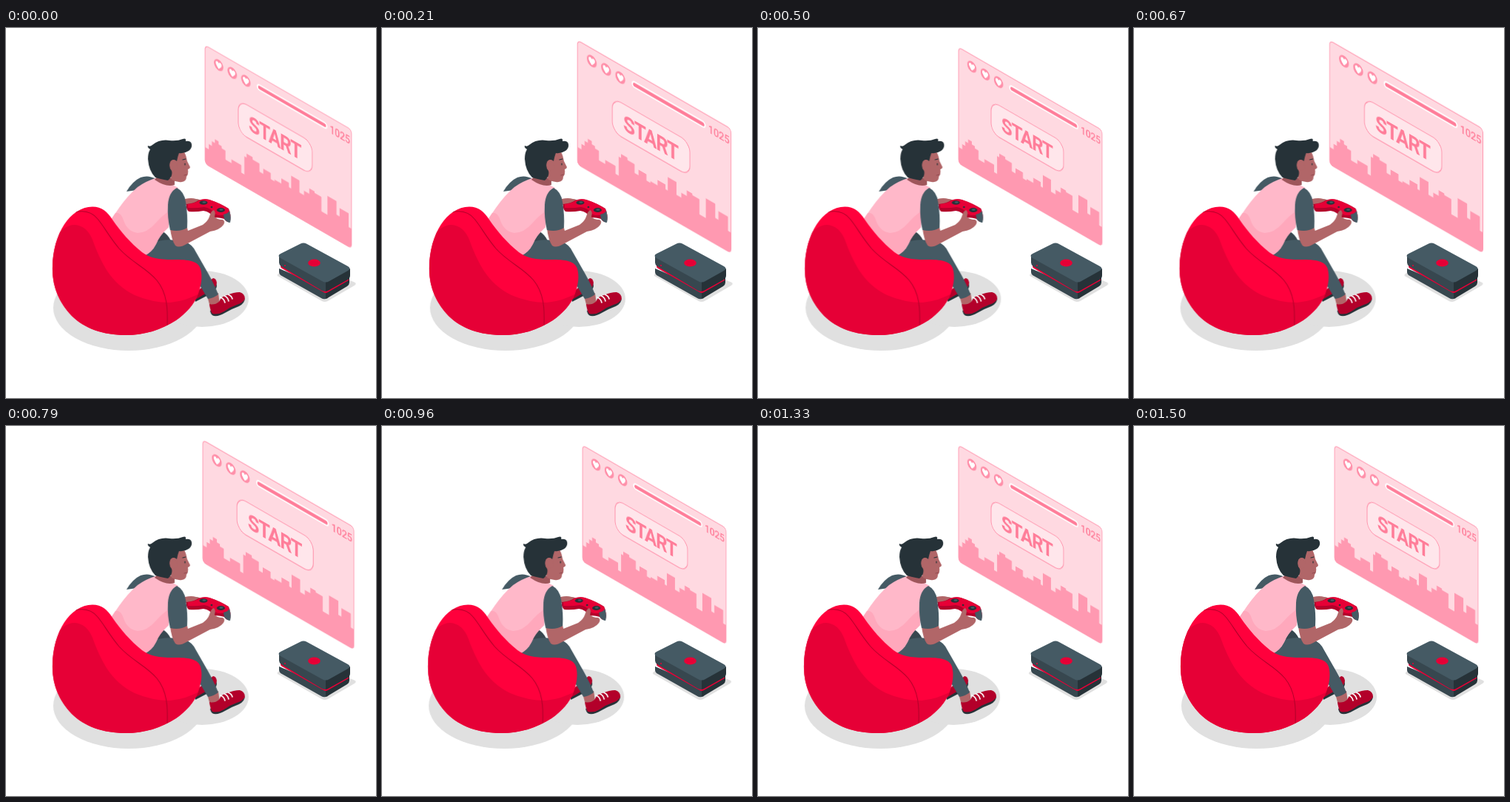
An HTML page for the animation above (1.54 s loop, 500 by 500 pixels).

```html
<!DOCTYPE html>
<html lang="en">
<head>
<meta charset="utf-8">
<title>Game night</title>
<style>
  html, body { margin: 0; width: 100%; height: 100%; overflow: hidden; background: #fff; }
  svg { display: block; width: 100vw; height: 100vh; }
  text { font-family: Roboto, sans-serif; text-anchor: middle; fill: #ff7d99; }

  /* 1.5 s cycles (steps of 150 ms) followed by a 40 ms rest */
  .shake, .beat { animation: shake 1.54s linear -30ms infinite; }
  .beat { animation-name: beat; transform-origin: 368px 161px; }
  @keyframes shake {
    0%, 97.4%, 100% { transform: translateX(0); }
    9.74%, 87.66% { transform: translateX(-1px); }
    19.48%, 77.92% { transform: translateX(2px); }
    29.22%, 48.7%, 68.18% { transform: translateX(-4px); }
    38.96%, 58.44% { transform: translateX(4px); }
  }
  @keyframes beat {
    0%, 29.22%, 38.96%, 58.44%, 100% { transform: scale(1); }
    9.74%, 48.7% { transform: scale(1.1); }
  }

  .slate { fill: #455a64; }
  .steel { fill: #37474f; }
  .ink { fill: #263238; }
  .skin { fill: #b16668; }
  .red { fill: #ff003c; }
  .crimson { fill: #e60036; }
  .wine { fill: #b3002a; }
  .rose { fill: #ff8fa9; }
  .line { fill: none; stroke-linecap: round; stroke-linejoin: round; }
</style>
</head>
<body>
<svg viewBox="0 0 500 500">
  <defs>
    <clipPath id="panel"><rect width="224" height="157" rx="5"/></clipPath>
    <clipPath id="bag">
      <path id="bagShape" d="M63 322 C64 279 86 242 117 241.5 C130 241.5 137 248 144 259
        C155 275 168 290 184 303 C195 311 207 313 225 313 C242 313 259 313 263 325
        C266 336 264 348 260 359 C255 373 243 386 230 395 C210 408 187 415 162 415
        C132 415 106 406 89 389 C72 371 62 349 63 322 Z"/>
    </clipPath>
    <g id="life">
      <circle r="7.2" class="rose"/>
      <path d="M0 5 C-3 2.5 -4.6 .5 -4.6 -1.5 C-4.6 -4.5 -1 -5 0 -2.2 C1 -5 4.6 -4.5 4.6 -1.5 C4.6 .5 3 2.5 0 5 Z" fill="#fff"/>
    </g>
  </defs>

  <g class="shake" fill="#e0e0e0">
    <ellipse cx="166" cy="378" rx="102" ry="58"/>
    <ellipse cx="265" cy="366" rx="63" ry="38"/>
    <path d="M367 335 Q366 333 370 331 L405 316 L472 344 Q474 346 471 348 L435 369 Q431 371 427 369 Z"/>
  </g>

  <!-- Screen, drawn flat and projected -->
  <g class="beat">
    <g transform="matrix(.866 .5 0 1 271 26)">
      <rect width="224" height="157" rx="5" fill="#ffd9e1"/>
      <g clip-path="url(#panel)">
        <path id="city" transform="scale(1.155 1)" fill="#ff99b1"/>
      </g>
      <rect width="224" height="157" rx="5" fill="none" stroke="#ff99b1"/>
      <use href="#life" x="20.8" y="16"/>
      <use href="#life" x="41.6" y="16"/>
      <use href="#life" x="62.4" y="16"/>
      <rect x="79" y="10.2" width="108" height="8.6" rx="4.3" fill="#fff"/>
      <rect x="81" y="12.2" width="104" height="4.8" rx="2.4" fill="#ff7d99"/>
      <text x="206" y="20.5" font-size="14" font-weight="500" letter-spacing="-.2">1025</text>
      <rect x="50.8" y="47" width="113" height="43" rx="13" fill="#ffe6eb" stroke="#ff8fa9"/>
      <text x="106.5" y="79.5" font-size="28" font-weight="700" letter-spacing="-1.3">START</text>
    </g>
  </g>

  <!-- Console -->
  <g>
    <path class="steel" d="M369 325 L432 352 V366 Q429 367 426 365 L371 334 Q369 332 369 330 Z"/>
    <path class="ink" d="M432 352 L464 336 V344 Q464 347 461 349 L436 364 Q434 366 432 366 Z"/>
    <path class="crimson" d="M371 319 L432 350 L463 334 V341 L435 357 Q432 359 429 357 L373 325 Q371 324 371 322 Z"/>
    <path class="steel" d="M369 306 L432 343 V356 Q429 356 427 355 L372 322 Q369 320 369 317 Z"/>
    <path class="ink" d="M432 342 L465 325 V334 Q465 338 462 340 L437 354 Q434 356 432 356 Z"/>
    <path class="slate" d="M371 305 L398 291.5 Q402 289.5 406 291.5 L462 322 Q467 325 462 328 L437 342 Q432 345 427 342 L371 311 Q366 308 371 305 Z"/>
    <ellipse cx="416.5" cy="317.5" rx="8.3" ry="4.9" class="crimson"/>
    <circle cx="377" cy="321" r="1" class="crimson"/>
  </g>

  <g class="shake">
    <!-- Far shoe and legs -->
    <path class="wine" d="M256 358 L270 346 L280 338 Q284 338 285 344 Q285 351 278 355 L256 368 Z"/>
    <path class="ink" d="M256 367 L278 354 Q284 351 285 345 Q286 353 279 358 L256 370 Z"/>
    <path class="steel" d="M200 276 Q208 271 215 277 Q221 282 224 290 L203 298 Z"/>
    <path class="skin" d="M272 362 L287 358 L289 373 L276 377 Z"/>
    <path class="slate" d="M183 308 L201 290 Q215 283 242 289 Q252 292 257 303 L273 331 Q282 347 287 360 Q281 365 273 366 L258 341 L240 320 Z"/>

    <!-- Near shoe -->
    <path class="ink" d="M276 382 Q277 388 281 389 Q288 390 296 385 Q304 380 315 376 Q323 372 323 365 L318 366 Z"/>
    <path class="wine" d="M275 373 Q282 375 288 370 Q291 362 299 361 Q308 357 316 357 Q323 359 323 366
      Q321 371 312 374 Q303 377 295 383 Q287 388 279 386 Q276 382 275 373 Z"/>
    <path class="line" stroke="#fff" stroke-width="1.7" d="M290 364 Q295 366 296 371 M295.5 362 Q300 364 301 369 M301 360.5 Q305 362 306 366"/>

    <!-- Torso -->
    <path class="slate" d="M163 221 Q171 207 182 202 Q192 198 203 204 L184 218 Z"/>
    <path fill="#ffb8c9" d="M202 203 Q189 207 178 215 Q165 226 153 243 L140 262 L160 290 L186 308
      Q197 304 203 292 Q207 281 220 269 L221 238 L233 216 Q219 208 202 203 Z"/>
    <path fill="#ffa8bc" d="M148 250 Q155 248 159 260 Q164 275 178 277 Q191 277 203 263 Q213 252 220 248
      V269 Q207 281 203 292 Q197 304 186 308 L160 290 L140 262 Z"/>

    <!-- Head -->
    <path fill="#9e565b" d="M207 198 L228 204 V212 Q217 216 201 205 Z"/>
    <path class="skin" d="M220 178 Q228 166 241 167 Q244 173 245 180 L249 188 Q249 190 246 191
      Q247 197 244 201 Q244 207 238 208 Q231 209 224 205 Q219 190 220 178 Z"/>
    <path class="ink" d="M195 164 Q191 162 192 159 Q195 161 198 158 Q208 150 221 152 Q232 153 239 150
      Q244 148 243 153 Q250 152 251 157 Q252 162 247 166 Q241 170 234 169 Q232 174 231 180
      Q227 176 223 180 Q219 187 224 193 Q226 200 219 206 Q208 204 202 202 Q193 193 192 177 Q192 169 195 164 Z"/>
    <path class="skin" d="M231 181 Q226 175 222 181 Q220 188 226 193 L233 190 Z"/>
    <path class="line" stroke="#263238" stroke-width="1.2" d="M239 178 L243 177 M242 183 V185"/>
    <path class="line" stroke="#8f474d" stroke-width=".9" d="M241 199 L245 198"/>

    <!-- Controller and hands -->
    <path class="skin" d="M242 231 Q251 229 257 231 Q263 231 263 235 L253 240 L242 239 Z"/>
    <path class="wine" d="M244 238 Q255 237 260 233 Q267 230 275 232 Q290 237 301 244 Q305 253 303 261
      Q299 264 295 258 Q286 255 281 257 Q276 248 267 247 Q257 249 247 248 Q243 244 244 238 Z"/>
    <path class="crimson" d="M246 238 Q257 237 261 233 Q268 230 275 232 Q290 237 300 244
      Q303 248 300 251 Q291 255 284 252 Q277 243 268 242 Q256 244 246 243 Z"/>
    <path class="slate" d="M294 252 Q300 251 302 247 Q305 256 303 263 Q299 263 295 258 Z"/>
    <g class="ink">
      <ellipse cx="267" cy="236" rx="5.5" ry="2.8"/>
      <ellipse cx="290.5" cy="246" rx="5.5" ry="3"/>
      <circle cx="278" cy="242" r="1.3"/>
    </g>
    <g class="slate">
      <ellipse cx="268" cy="235.5" rx="2.6" ry="1.3"/>
      <ellipse cx="291" cy="245.5" rx="2.6" ry="1.3"/>
    </g>
    <path class="skin" d="M222 271 L245 270 L246 274 L266 266 Q273 261 275 255 Q277 247 281 246 Q284 249 282 255
      Q285 259 293 259 Q297 261 294 266 Q289 273 276 275 L244 292 Q234 298 229 294 Q224 287 222 271 Z"/>
    <path class="slate" d="M231 216 Q241 221 243 235 Q246 253 245 270 Q235 276 222 273 Q218 256 219 239 Q220 222 231 216 Z"/>

    <!-- Beanbag -->
    <use href="#bagShape" class="red"/>
    <g clip-path="url(#bag)">
      <path class="crimson" d="M55 300 Q74 266 93 266 Q109 267 117 286 Q125 309 136 327
        Q151 350 174 361 Q197 371 222 371 Q246 369 270 354 V425 H55 Z"/>
      <path class="line" stroke="#b3002a" stroke-width="1.1" d="M93 249 Q113 244 124 258
        C134 270 138 280 153 298 C170 317 190 324 204 341 C218 358 219 380 218 403"/>
    </g>
  </g>
</svg>
<script>
  // Skyline steps: right edge and roof height of each block
  const roofs = [
    [5, 135], [9, 128], [13, 122], [18, 117], [22, 121], [27, 124], [35, 136],
    [48, 131], [52, 141], [55, 117], [63, 112], [72, 115], [77, 126], [87, 119],
    [92, 127], [101, 125], [111, 118], [114, 124], [125, 107], [131, 123],
    [138, 117], [145, 110], [154, 112], [162, 131], [174, 106], [178, 124],
    [190, 113], [195, 131]
  ];
  const steps = roofs.map(([x, y]) => `V ${y} H ${x}`).join(' ');
  document.getElementById('city').setAttribute('d', `M 0 158 ${steps} V 158 Z`);
</script>
</body>
</html>
```
